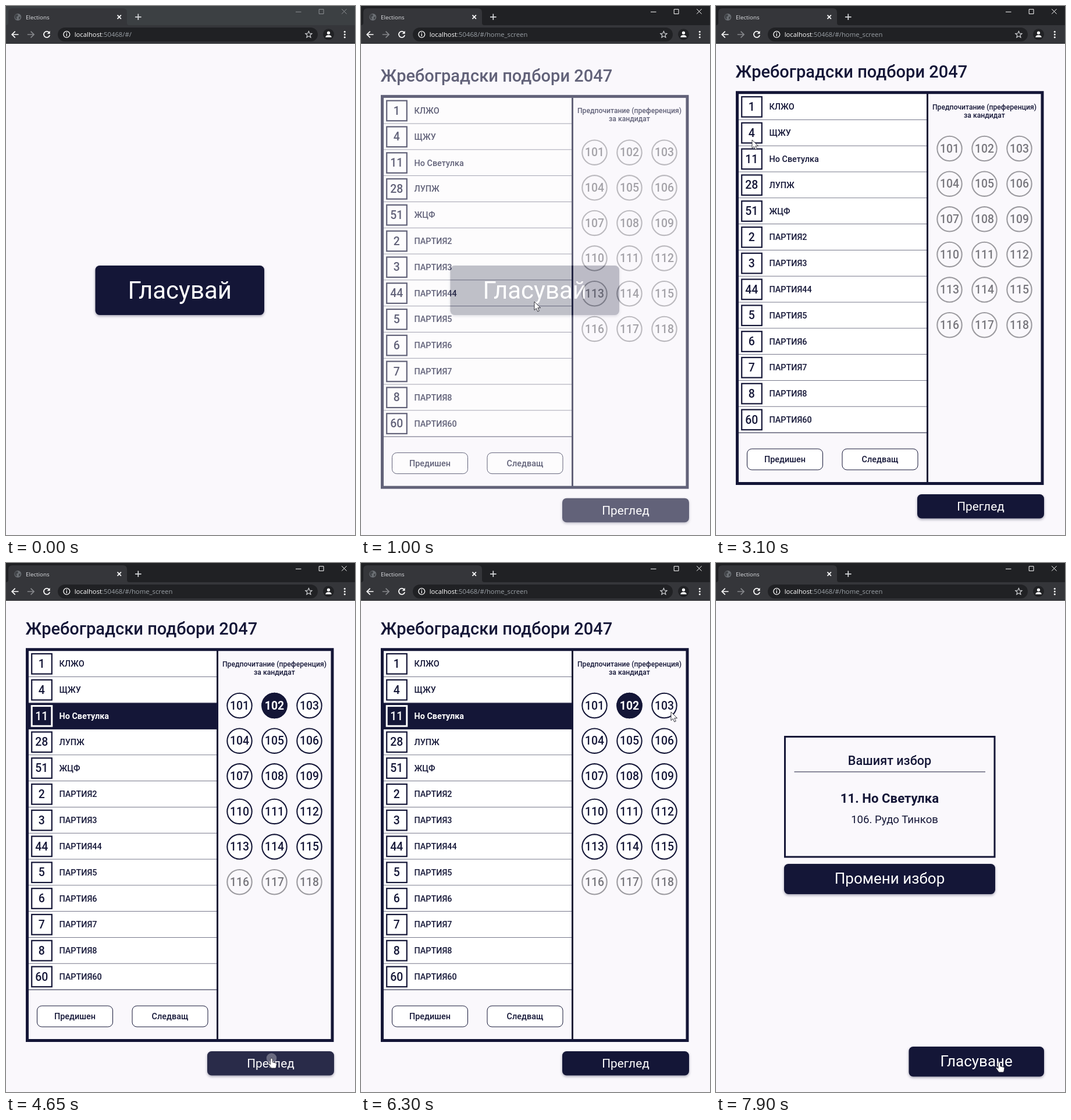
Write an HTML page that moves like this. It is 600 by 909 pixels and loops after 8 s.

```html
<!DOCTYPE html>
<html lang="bg">
<head>
<meta charset="utf-8">
<title>Elections</title>
<style>
html, body { margin: 0; width: 100%; height: 100%; overflow: hidden; background: #faf8fc; }
svg.stage { display: block; width: 100vw; height: 100vh; }
text { font-family: Roboto, sans-serif; fill: #141637; }
.mid { text-anchor: middle; }
.m { font-weight: 500; }
.b { font-weight: 700; }
.w, .w text { fill: #fff; }
.ui { font-family: "Open Sans", "Noto Sans", sans-serif; }
.primary { fill: #141637; filter: drop-shadow(0 2px 2px rgba(20, 22, 55, .38)); }
.icon { fill: none; stroke: #fff; stroke-width: 1.7; }
</style>
</head>
<body>
<script>
const INK = '#141637', PAPER = '#faf8fc', LOOP = 8000;
const PARTY = 'Но Светулка', PERSON = 'Рудо Тинков';

// ---------- markup helpers ----------
const rect = (x, y, w, h, attrs = '') =>
  `<rect x="${x}" y="${y}" width="${w}" height="${h}" ${attrs}/>`;
const text = (x, y, size, str, cls = '', attrs = '') =>
  `<text x="${x}" y="${y}" font-size="${size}" class="${cls}" ${attrs}>${str}</text>`;
const group = (id, body, attrs = '') => `<g id="${id}" ${attrs}>${body}</g>`;
const path = (d, attrs = '') => `<path d="${d}" ${attrs}/>`;

const splash = (id, x, y, w, h, color) =>
  `<svg x="${x}" y="${y}" width="${w}" height="${h}" viewBox="${x} ${y} ${w} ${h}">` +
  `<circle id="${id}Splash" fill="${color}" opacity="0"/></svg>`;

const primary = (id, x, y, w, h, size, base, label) =>
  rect(x, y, w, h, 'rx="7.5" class="primary"') +
  rect(x, y, w, h, `rx="7.5" fill="#fff" opacity="0" id="${id}Hover"`) +
  splash(id, x, y, w, h, '#fff') +
  text(x + w / 2, base, size, label, 'mid w');

const outlined = (id, x, label) =>
  rect(x, 761, 130, 36, `rx="8" fill="#fff" stroke="${INK}"`) +
  splash(id, x, 761, 130, 36, INK) +
  text(x + 65, 784, 14.4, label, 'mid m');

function row(i, num, label, on) {
  const y = 151 + 44.8 * i, cls = on ? 'w' : '';
  return rect(39, y, 323, 44.8, `fill="${on ? INK : '#fff'}"`) +
    rect(39, y + 44, 323, 1.4, `fill="${INK}" opacity=".72"`) +
    rect(44.2, y + 5, 34.6, 34.6, `fill="none" stroke="${on ? '#fff' : INK}" stroke-width="${on ? 3 : 2.2}"`) +
    text(61.3, y + 29, 19.4, num, 'mid m ' + cls) +
    text(91.5, y + 27.3, 14.4, label, (on ? 'b ' : 'm ') + cls);
}

function circle(n, mode) {
  const x = 401.5 + 60 * (n % 3), y = 245 + 60.65 * Math.floor(n / 3);
  const [fill, line, ink] = {
    off: [PAPER, '#9b9a9f', '#78777d'],
    on: ['#fff', INK, INK],
    sel: [INK, INK, '#fff']
  }[mode];
  return `<circle cx="${x}" cy="${y}" r="21.2" fill="${fill}" stroke="${line}" stroke-width="2.1"/>` +
    text(x, y + 6.8, 19.4, 101 + n, 'mid ' + (mode === 'sel' ? 'b' : 'm'), `style="fill:${ink}"`);
}

const circles = (from, to, mode) =>
  Array.from({ length: to - from }, (_, i) => circle(from + i, mode)).join('');

// ---------- pages ----------
const blank = rect(0, 65, 600, 844, `fill="${PAPER}"`);
const named = ['КЛЖО', 'ЩЖУ', PARTY, 'ЛУПЖ', 'ЖЦФ'];
const firstList = [1, 4, 11, 28, 51, 2, 3, 44, 5, 6, 7, 8, 60]
  .map((n, i) => row(i, n, named[i] || 'ПАРТИЯ' + n)).join('');
const secondList = Array.from({ length: 9 }, (_, i) => row(i, 61 + i, 'ПАРТИЯ' + (61 + i))).join('');

const home = group('home', blank + primary('start', 153.5, 446, 290.5, 85, 42, 502.5, 'Гласувай'));

const form = group('form', blank +
  text(33.5, 123, 29, 'Жребоградски подбори 2047', 'm') +
  group('listA', firstList) + group('listB', secondList) +
  group('pickedRow', row(2, 11, PARTY, true)) +
  rect(36.5, 148.7, 524.5, 671.8, `fill="none" stroke="${INK}" stroke-width="5"`) +
  rect(362, 151, 3, 668, `fill="${INK}"`) +
  text(461.5, 177.7, 12.2, 'Предпочитание (преференция)', 'mid m') +
  text(461.5, 191.5, 12.2, 'за кандидат', 'mid m') +
  circles(15, 18, 'off') +
  group('circlesOff', circles(0, 15, 'off')) +
  group('circlesOn', circles(0, 15, 'on')) +
  group('pick102', circle(1, 'sel')) + group('pick106', circle(5, 'sel')) +
  outlined('prev', 53.5, 'Предишен') + outlined('next', 217, 'Следващ') +
  primary('review', 346, 839, 218, 41.5, 20.8, 867, 'Преглед'));

const summary = group('summary', blank +
  rect(118.5, 298.5, 360.5, 206.5, `fill="none" stroke="${INK}" stroke-width="3"`) +
  text(298.5, 347, 21.6, 'Вашият избор', 'mid m') +
  rect(134.5, 358.2, 328.5, 1.3, `fill="${INK}" opacity=".75"`) +
  text(298.5, 412, 22.2, '11. ' + PARTY, 'mid b') +
  text(307, 447, 18.6, '', 'mid', 'id="choice"') +
  primary('change', 117, 517, 363, 52, 26, 550.5, 'Промени избор') +
  primary('vote', 331.5, 831, 232.5, 51.5, 26, 865, 'Гласуване'));

// ---------- browser window ----------
const chrome =
  rect(0, 0, 600, 34, 'id="strip"') +
  path('M0 33q4 0 4-4V11q0-7 7-7H201q7 0 7 7V29q0 4 4 4z', 'fill="#35363a"') +
  rect(0, 33, 600, 32, 'fill="#35363a"') +
  '<circle cx="20.3" cy="19" r="6" fill="#6b6f74"/>' +
  path('M16 15l4-1 1 3-3 2 1 3-2 1-2-4zM22 19l3-1-1 4-2 1z', 'fill="#3f4246"') +
  text(34, 22.5, 9.8, 'Elections', 'ui', 'style="fill:#dfe1e5"') +
  path('M191.5 15.7l6.4 6.4m0-6.4l-6.4 6.4', 'class="icon" stroke-width="1.4"') +
  path('M222 18.8h10.6m-5.3-5.3v10.6', 'class="icon" style="stroke:#d5d7da"') +
  group('buttons', path('M498 10.2h9.5M538.2 5.7h7.8v7.8h-7.8zM577.2 5.2l8.4 8.4m0-8.4l-8.4 8.4',
    'fill="none" stroke-width="1"')) +
  path('M21.5 49h-11m5.2-5.3L10.2 49l5.5 5.3', 'class="icon"') +
  path('M36.8 49h11m-5.2-5.3l5.5 5.3-5.5 5.3', 'class="icon" style="stroke:#85878b"') +
  path('M74 45.3A5.2 5.2 0 1 0 75.2 50', 'class="icon"') +
  path('M75.6 42.8v5h-5z', 'fill="#fff"') +
  rect(89, 37, 447, 24, 'rx="12" fill="#202124"') +
  '<circle cx="104.3" cy="48.8" r="5.4" class="icon" style="stroke-width:1.3"/>' +
  path('M104.3 48v3.8m0-6.2v1.4', 'class="icon" style="stroke-width:1.4"') +
  text(117.7, 52.8, 11.3, '<tspan fill="#fff">localhost</tspan><tspan id="route" fill="#9aa0a6"></tspan>', 'ui') +
  path('M520.4 43.3l1.6 3.8 4 .3-3.1 2.6 1 4-3.5-2.2-3.5 2.2 1-4-3.1-2.6 4-.3z',
    'class="icon" style="stroke:#dcdee1;stroke-width:1.1"') +
  '<circle cx="554.5" cy="48.8" r="9.5" fill="#202124"/><circle cx="554.5" cy="46.2" r="2.6" fill="#fff"/>' +
  path('M549.3 53.8q0-3.9 5.2-3.9t5.2 3.9z', 'fill="#fff"') +
  [44.3, 49, 53.7].map(y => `<circle cx="582.3" cy="${y}" r="1.5" fill="#fff"/>`).join('');

const pointer = group('pointer',
  group('arrow', path('M0 0V14.6L3.4 11.5 5.8 17 8.3 15.9 5.9 10.6H10.6z')) +
  group('hand', path('M0 0c1.3 0 1.8.8 1.8 1.8v5l5.2 1.2c1.5.4 2 1.2 1.8 2.6l-.8 4.5c-.2 1.4-1 2-2.2 2' +
    'h-5c-1 0-1.6-.4-2.2-1.2l-4-5.6c-.6-1 .6-2 1.7-1.3l1.9 1.4V1.8C-1.8.8-1.2 0 0 0z')),
  'fill="#fff" stroke="#22222c" stroke-width=".9" stroke-linejoin="round"');

document.body.innerHTML =
  `<svg class="stage" viewBox="0 0 600 909" preserveAspectRatio="none">${home}${form}${summary}${chrome}${pointer}</svg>`;
const $ = Object.fromEntries([...document.querySelectorAll('[id]')].map(el => [el.id, el]));

// ---------- timeline ----------
const moves = [ // time, x, y
  [0, 298, 508], [1050, 298, 508], [1380, 245, 781], [2050, 245, 781], [2380, 132, 783],
  [2520, 132, 783], [2900, 66, 300], [3100, 62, 230], [3260, 88, 262], [3440, 88, 262],
  [3860, 458, 248], [4080, 458, 248], [4500, 456.5, 851], [5450, 456.5, 851], [5700, 380, 543],
  [5880, 380, 543], [6250, 533, 256], [6300, 533, 256], [6500, 524, 305], [6800, 524, 305],
  [7300, 487, 858], [LOOP, 487, 858]
];
const taps = [ // button, time, x, y, strength
  ['start', 720, 298, 508, .25], ['next', 1410, 245, 781, .12], ['prev', 2420, 132, 783, .12],
  ['review', 4600, 456.5, 851, .3], ['change', 5750, 380, 543, .3], ['review', 7600, 487, 858, .3]
];
const hovers = { start: [[700, 1100]], review: [[4440, 5000], [7220, LOOP]], change: [[5620, 6100]] };
const hands = [[700, 790], [4440, 5480], [5620, 5830], [7220, LOOP]];

const clamp = v => Math.min(1, Math.max(0, v));
const within = (t, spans) => spans.some(([a, b]) => t >= a && t < b);
const show = (el, on) => { el.style.display = on ? '' : 'none'; };

// Bezier easing whose end heights are 0 and 1
function ease(x, x1, x2) {
  let lo = 0, hi = 1, s = .5;
  for (let i = 0; i < 20; i++) {
    s = (lo + hi) / 2;
    const at = 3 * (1 - s) * (1 - s) * s * x1 + 3 * (1 - s) * s * s * x2 + s * s * s;
    if (at < x) lo = s; else hi = s;
  }
  return s * s * (3 - 2 * s);
}

function enter(el, p) {
  show(el, p > 0);
  el.setAttribute('opacity', ease(p, .42, 1));
  el.setAttribute('transform', `translate(0 ${211 * (1 - ease(p, .4, .2))})`);
}

function movePointer(t) {
  const i = moves.findIndex((m, n) => n && t <= m[0]);
  const [a, x, y] = moves[i - 1] || moves[0], [b, u, v] = moves[i];
  const k = ease(clamp((t - a) / (b - a)), .42, .58);
  $.pointer.setAttribute('transform', `translate(${x + (u - x) * k} ${y + (v - y) * k})`);
  const hand = within(t, hands);
  show($.pointer, t >= 700);
  show($.hand, hand);
  show($.arrow, !hand);
}

function drawTaps(t) {
  for (const [id] of taps) $[id + 'Splash'].setAttribute('opacity', 0);
  for (const [id, at, x, y, strength] of taps) {
    const age = t - at;
    if (age < 0 || age > 480) continue;
    const c = $[id + 'Splash'];
    c.setAttribute('cx', x);
    c.setAttribute('cy', y);
    c.setAttribute('r', 3 + 200 * (age / 300) ** 2);
    c.setAttribute('opacity', strength * (1 - clamp((age - 80) / 400)));
  }
  for (const id in hovers) $[id + 'Hover'].setAttribute('opacity', within(t, hovers[id]) ? .09 : 0);
}

function render(t) {
  const active = t >= 700, picked = t >= 3340, second = t >= 1440 && t < 2480;
  $.strip.setAttribute('fill', active ? '#202124' : '#3c4043');
  $.buttons.setAttribute('stroke', active ? '#fff' : '#8d9094');
  $.route.textContent = ':50468/#/' + (t >= 768 ? 'home_screen' : '');

  show($.listA, !second);
  show($.listB, second);
  show($.pickedRow, picked);
  show($.circlesOff, !picked);
  show($.circlesOn, picked);
  show($.pick102, t >= 4000 && t < 6660);
  show($.pick106, t >= 6660);
  $.choice.textContent = (t < 6660 ? '102. ' : '106. ') + PERSON;

  enter($.form, clamp((t - 768) / 300));
  enter($.summary, t < 5790 ? clamp((t - 4670) / 300)
    : t < 7000 ? clamp((6090 - t) / 300)
    : clamp((t - 7645) / 250));
  drawTaps(t);
  movePointer(t);
}

const began = performance.now();
function frame() {
  render((performance.now() - began) % LOOP);
  requestAnimationFrame(frame);
}
render(0);
requestAnimationFrame(frame);
</script>
</body>
</html>
```
